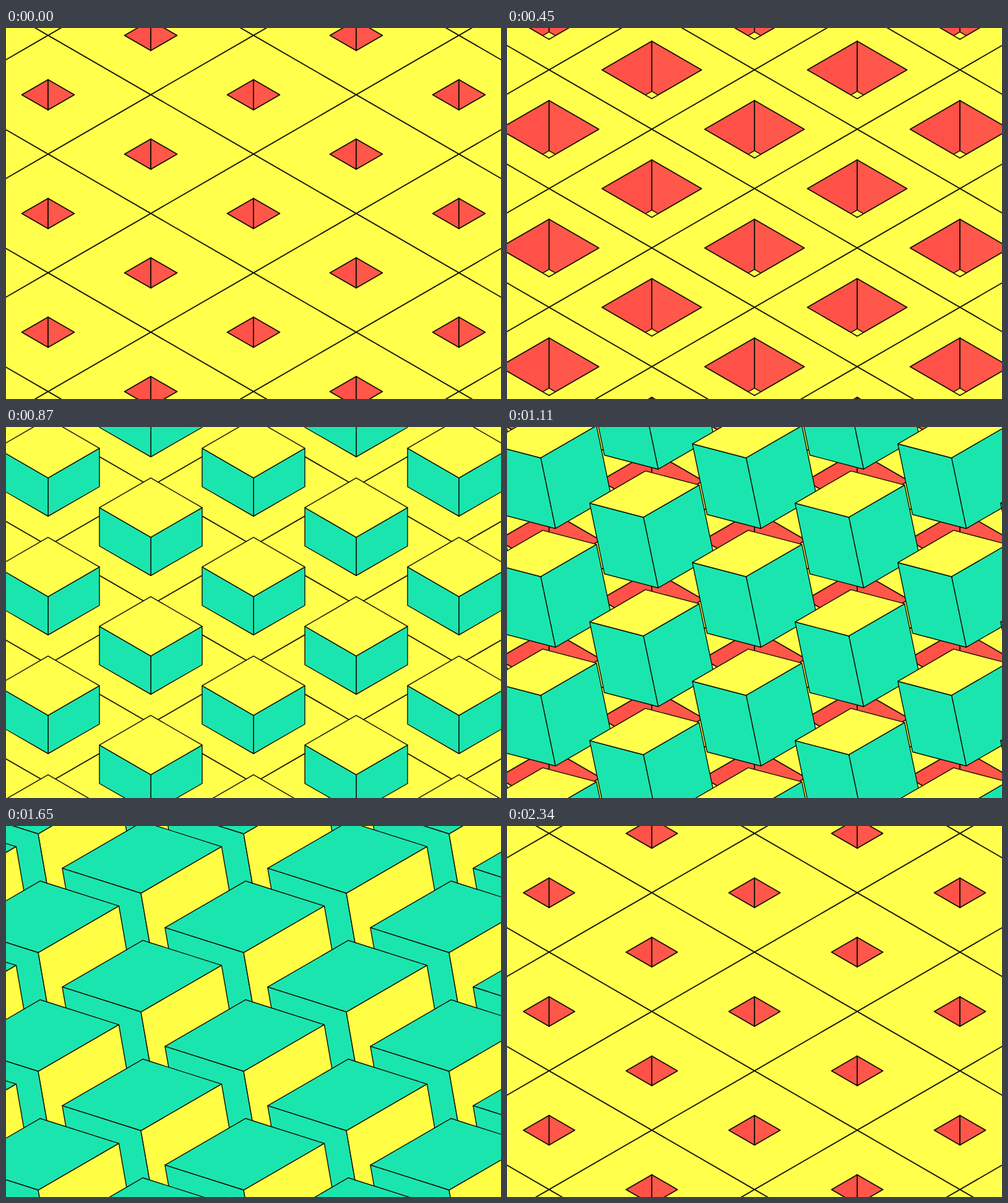
An HTML page that plays this animation: 800x600 px, repeating every 2.37 s.

```html
<!DOCTYPE html>
<html lang="en">
<head>
<meta charset="utf-8">
<title>Turning cubes</title>
<style>
  html, body { margin: 0; width: 100%; height: 100%; overflow: hidden; background: #ffff4c; }
  svg { display: block; width: 800px; height: 600px; }
</style>
</head>
<body>
<svg viewBox="0 0 800 600" stroke="#100c00" stroke-linejoin="round">
  <defs>
    <clipPath id="mouth"><path id="mouthPath"/></clipPath>
    <g id="cell">
      <path d="M-166 0L0 -96L166 0L0 96Z" fill="#ffff4c" stroke-width="1.6"/>
      <g id="hole" stroke-width="1.7">
        <path id="wallL" fill="#ff5148"/>
        <path id="wallR" fill="#ff574a"/>
      </g>
    </g>
    <g id="cube" stroke-width="1.4">
      <path id="side" fill="#1be5ae"/>
      <path id="front" fill="#1be5ae"/>
      <path id="cap"/>
    </g>
  </defs>
  <g id="plane"></g>
  <g id="cubes"></g>
</svg>
<script>
const FRAME = 30, COUNT = 79;
const HALF_W = 83, HALF_H = 48;   // half-size cube footprint
const STEP_X = 166, STEP_Y = 96;  // lattice
const TURN_START = 32.75, TURN_LENGTH = 39.6;
const RIM = .9;                   // keeps the front rim line visible
const $ = id => document.getElementById(id);

const clamp = x => Math.max(0, Math.min(1, x));
const smooth = x => x * x * (3 - 2 * x);
const ease = (x, g) => x < .5 ? .5 * (2 * x) ** g : 1 - .5 * (2 - 2 * x) ** g;
const mod = (a, n) => ((a % n) + n) % n;

const poly = pts => 'M' + pts.map(p => p.map(v => v.toFixed(2)).join(' ')).join('L') + 'Z';
const mix = (a, ka, b, kb) => [a[0] * ka + b[0] * kb, a[1] * ka + b[1] * kb];

// Parallelogram spanned by a and b around the point c
function face(c, a, b) {
  return poly([[-1, -1], [1, -1], [1, 1], [-1, 1]].map(([i, j]) => {
    const d = mix(a, i / 2, b, j / 2);
    return [c[0] + d[0], c[1] + d[1]];
  }));
}

function fillLattice(layer, id) {
  let html = '';
  for (let j = -4; j <= 11; j++)
    for (let i = -4; i <= 4; i++)
      if ((i + j) % 2 === 0)
        html += `<use href="#${id}" x="${400 + i * STEP_X}" y="${j * STEP_Y}"/>`;
  layer.innerHTML = html;
}

const shift = (layer, y) =>
  layer.setAttribute('transform', `translate(0 ${mod(y, 2 * STEP_Y).toFixed(2)})`);

function holeSize(n) {
  if (n < 40) return .5 + .5 * ease(clamp((n + 1) / 18), 1.4);
  const x = clamp((n - 71) / 7);
  return n < 72 ? 1 : .5 * (1 - (1 - x) ** 2);
}

function drawHole(size) {
  const w = HALF_W * size, h = HALF_H * size;
  $('wallL').setAttribute('d', poly([[-w, 0], [0, -h], [0, h]]));
  $('wallR').setAttribute('d', poly([[w, 0], [0, -h], [0, h]]));
}

function drawCube(turn) {
  const k = 1 + turn, angle = Math.PI * turn;
  const c = Math.cos(angle), s = Math.sin(angle);
  const x = [HALF_W * k, HALF_H * k], z = [0, -2 * HALF_H * k];
  const a = [HALF_W * k, -HALF_H * k];
  const u = mix(x, c, z, s), w = mix(z, c, x, -s);
  const sideDir = c + s > 0 ? .5 : -.5, capDir = c - s > 0 ? .5 : -.5;
  $('front').setAttribute('d', face(mix(a, -.5, a, 0), u, w));
  $('side').setAttribute('d', face(mix(u, sideDir, u, 0), a, w));
  $('cap').setAttribute('d', face(mix(w, capDir, w, 0), a, u));
  const lit = clamp((turn - .37) / .35);
  $('cap').setAttribute('fill', capDir > 0 ? '#ffff4c'
    : `rgb(255,${Math.round(253 + 2 * lit)},${Math.round(42 + 46 * lit)})`);
}

function draw(n) {
  const turn = ease(clamp((n - TURN_START) / TURN_LENGTH), 1.15);
  const done = turn === 1;
  const planeY = done ? 300 : 300 + 590 * smooth(n / COUNT);
  const size = holeSize(n);

  shift($('plane'), planeY);
  drawHole(size);
  $('hole').style.display = size > 0 ? '' : 'none';
  $('cubes').style.display = done ? 'none' : '';
  if (done) return;

  const settle = 23.4 * Math.max(0, (48 - n) / 27) ** 1.7;
  const cubeY = 396 + 57.5 * (1 - turn) + settle;
  const drop = planeY - cubeY;
  shift($('cubes'), cubeY);
  drawCube(turn);

  // Until it has left the hole, the cube is hidden by the front rim
  const w = HALF_W * size + 1, h = HALF_H * size, rim = drop - RIM;
  $('mouthPath').setAttribute('d',
    poly([[-w, rim], [0, rim + h], [w, rim], [w, -900], [-w, -900]]));
  if (drop < HALF_H) $('cube').setAttribute('clip-path', 'url(#mouth)');
  else $('cube').removeAttribute('clip-path');
}

fillLattice($('plane'), 'cell');
fillLattice($('cubes'), 'cube');

const start = performance.now();
let last = -1;
function tick() {
  const n = Math.floor((performance.now() - start) / FRAME) % COUNT;
  if (n !== last) draw(last = n);
  requestAnimationFrame(tick);
}
tick();
</script>
</body>
</html>
```
